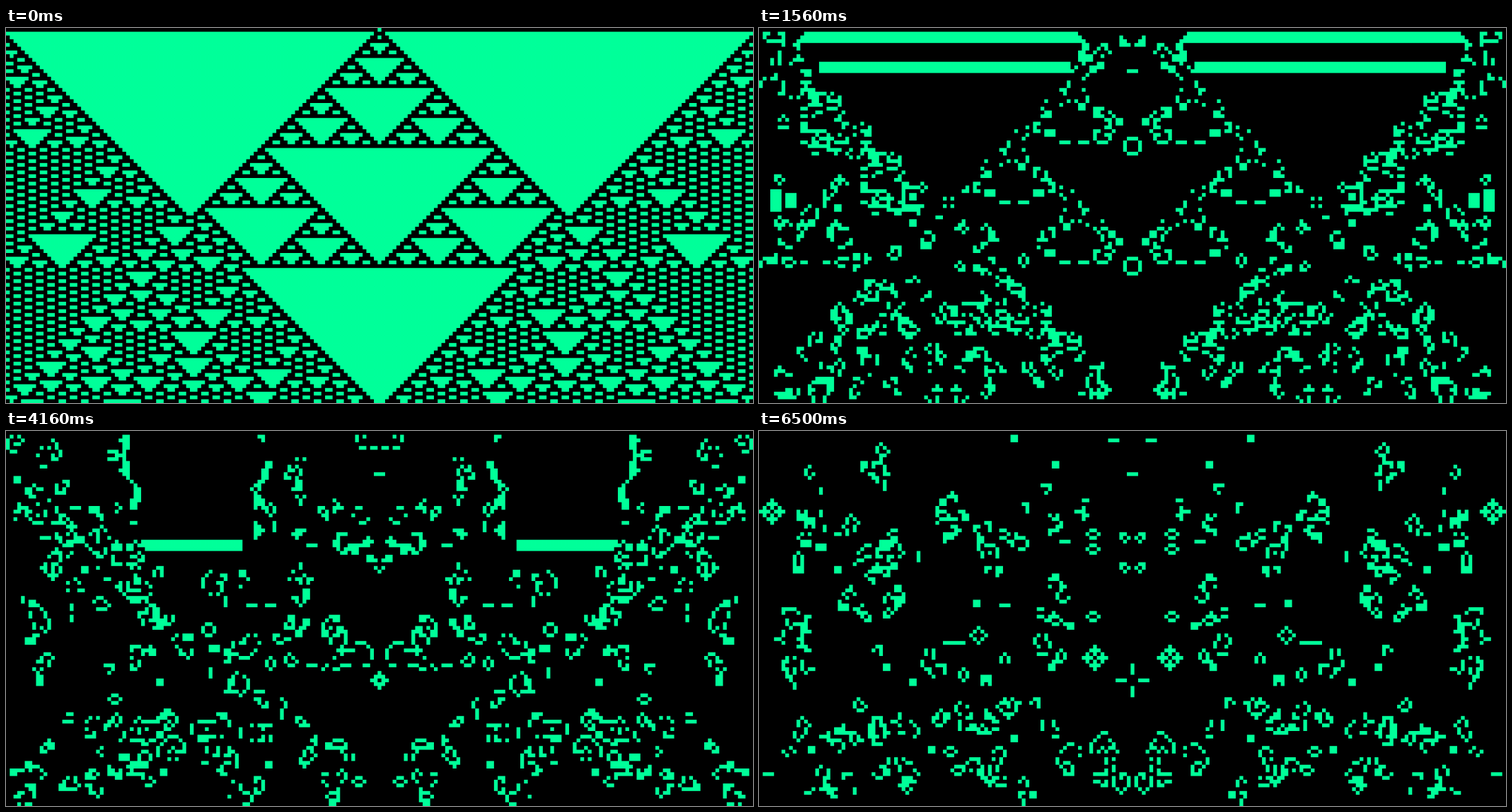
Recreate the animation shown at these times as an HTML page with a canvas. Size 1056 px wide and 530 px high, loop 6.63 s.

```html
<!DOCTYPE html>
<html lang="en">
<head>
<meta charset="utf-8">
<title>Cellular automaton</title>
<style>
  html, body { margin: 0; width: 100%; height: 100%; overflow: hidden; background: #000; }
  canvas { display: block; }
</style>
</head>
<body>
<canvas id="stage" width="1056" height="530"></canvas>
<script>
const W = 199, H = 100, STEP = 130, GENERATIONS = 51;
const canvas = document.getElementById('stage');
const ctx = canvas.getContext('2d');
ctx.scale(canvas.width / W, canvas.height / H);

// Cells outside the grid are dead.
const at = (grid, x, y) =>
  x >= 0 && x < W && y >= 0 && y < H ? grid[y * W + x] : 0;

// Elementary rule 129: a cell lives when all three cells above are equal.
function seed() {
  const grid = new Uint8Array(W * H);
  grid[W >> 1] = 1;
  for (let y = 1; y < H; y++) {
    for (let x = 0; x < W; x++) {
      const sum = at(grid, x - 1, y - 1) + at(grid, x, y - 1) + at(grid, x + 1, y - 1);
      grid[y * W + x] = sum % 3 === 0 ? 1 : 0;
    }
  }
  return grid;
}

// One generation of Conway's Game of Life.
function evolve(grid) {
  return grid.map((alive, i) => {
    const x = i % W, y = (i - x) / W;
    let sum = -alive;
    for (let dy = -1; dy <= 1; dy++)
      for (let dx = -1; dx <= 1; dx++) sum += at(grid, x + dx, y + dy);
    return sum === 3 || (alive && sum === 2) ? 1 : 0;
  });
}

const history = [seed()];
while (history.length < GENERATIONS) history.push(evolve(history[history.length - 1]));

// Adding light lets the soft edges of neighbouring cells join without seams.
function draw(grid) {
  ctx.globalCompositeOperation = 'source-over';
  ctx.fillStyle = '#000';
  ctx.fillRect(0, 0, W, H);
  ctx.globalCompositeOperation = 'lighter';
  ctx.fillStyle = '#00ff99';
  grid.forEach((alive, i) => {
    if (alive) ctx.fillRect(i % W, Math.floor(i / W), 1, 1);
  });
}

let start, shown = -1;
function tick() {
  const now = performance.now();
  start ??= now;
  const generation = Math.floor((now - start) / STEP) % GENERATIONS;
  if (generation !== shown) draw(history[shown = generation]);
  requestAnimationFrame(tick);
}
tick();
</script>
</body>
</html>
```
